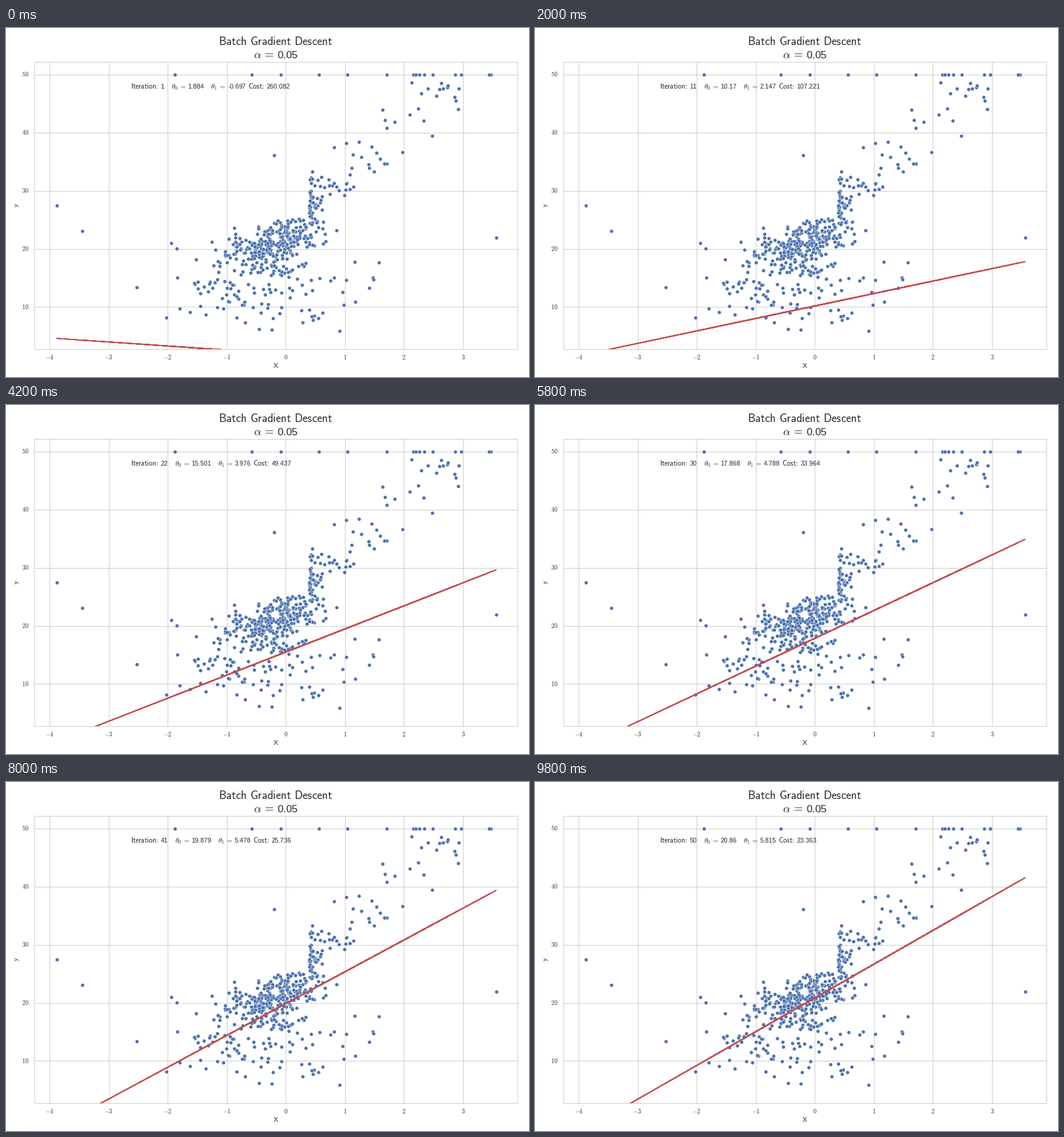
Recreate the animation shown at these times as a matplotlib script. Size 864 by 576 pixels, loop 10000 ms.

```python
import numpy as np
import matplotlib.pyplot as plt
from matplotlib.animation import FuncAnimation

W, H, DPI = 864, 576, 72
LEFT, RIGHT, TOP, BOTTOM = 46.8, 845.3, 56.3, 529.9   # plot box in pixels
X0, XS = 462.3, 97.57                                 # pixel of X = 0, pixels per unit
Y0, YS = 556.25, 9.583
BLUE, RED, INK, GRID = "#4C72B0", "#C44E52", "0.15", "0.8"

ALPHA, STEPS, INTERVAL = 0.05, 50, 200
BEST = np.array([22.532806, 6.38897])                 # least squares fit
GAP = np.array([20.6484, 7.08569])                    # distance to it at step 1
BEST_COST = 21.800276

WORD_SIZE, NUM_SIZE = 11.9, 10.5
ADVANCE = {".": 3.2, "-": 3.9}                        # every digit takes 5.85
SPACE = 3.97

plt.rcParams.update({
    "mathtext.fontset": "cm", "mathtext.default": "sf",
    "font.family": "Liberation Sans", "path.simplify": False,
})


def sans(s):
    """Upright sans math text with plain word spacing."""
    for c in ":=":
        s = s.replace(c, r"\hspace{-0.2}" + c + r"\hspace{-0.2}")
    return "$" + s.replace(" ", r"\hspace{0.38}") + "$"


def digits(s):
    """Text font laid out with the same metrics as math text."""
    return s + r"$\hspace{0}$"


def label(x, y, s, size, ha="center", **kw):
    """Text at a pixel position measured from the top left."""
    kw.setdefault("va", "baseline")
    return fig.text(x / W, 1 - y / H, s, fontsize=size, color=INK, ha=ha, **kw)


def fold(y, top):
    """Mirror values above a ceiling back below it."""
    return top - np.abs(top - y)


def make_points():
    rng = np.random.default_rng(11)
    capped = [-1.88, -0.58, -0.09, 0.56, 1.04, 1.71, 2.16, 2.2, 2.26,
              2.34, 2.49, 2.87, 2.97, 3.44, 3.47]
    lone = [(-3.88, 27.5), (-3.45, 23.1), (3.56, 21.9), (-0.2, 36.1),
            (1.47, 15.1), (1.58, 17.7), (0.98, 10.4)]
    core = rng.normal(-0.22, 0.42, 265)
    core_y = fold(21.6 + 3.2 * core + rng.normal(0, 2, core.size), 25.2)
    arm = 0.4 + 2.6 * rng.random(100) ** 2.5
    arm_y = fold(24 + 8.5 * arm + rng.normal(0, 2.7, arm.size), 49)
    low = rng.normal(-0.45, 0.75, 119)
    low_y = np.maximum(13 + rng.normal(0, 3.3, low.size), 5)
    groups = [(capped, np.full(len(capped), 50)), np.transpose(lone),
              (core, core_y), (arm, arm_y), (low, low_y)]
    return rng.permutation(np.hstack(groups).T)


fig = plt.figure(figsize=(W / DPI, H / DPI), dpi=DPI, facecolor="white")
ax = fig.add_axes([LEFT / W, 1 - BOTTOM / H, (RIGHT - LEFT) / W, (BOTTOM - TOP) / H])
ax.set_xlim((LEFT - X0) / XS, (RIGHT - X0) / XS)
ax.set_ylim((Y0 - BOTTOM) / YS, (Y0 - TOP) / YS)
ax.set_axisbelow(True)
ax.set_xticks(range(-4, 4))
ax.set_yticks(range(10, 51, 10))
ax.tick_params(length=0, labelbottom=False, labelleft=False)
ax.grid(color=GRID, lw=1)
for spine in ax.spines.values():
    spine.set(color=GRID, linewidth=1)

for t in range(-4, 4):
    label(X0 + t * XS, 547, rf"$\mathrm{{{t}}}$", 10)
for t in range(10, 51, 10):
    label(37.6, Y0 - t * YS + 3.4, rf"$\mathrm{{{t}}}$", 10, ha="right")
label(445.5, 561, sans("X"), 11.5)
label(18, 292, sans("y"), 11.5, va="center", rotation=90)
label(445.5, 28.3, sans("Batch Gradient Descent"), 18.7)
label(409, 50.3, sans(r"\alpha ="), 18.7, ha="left")
label(448, 50.3, digits(str(ALPHA)), 17, ha="left")

points = make_points()
ax.scatter(points[:, 0], points[:, 1], s=36, color=BLUE, edgecolors="white", linewidths=0.5)
fit, = ax.plot([], [], color=RED, lw=1.75, solid_capstyle="round")

# Status line: word, its width in pixels, spaces before it
WORDS = [("Iteration:", 49.2, 0), (r"\theta_{\mathrm{0}} =", 27.2, 3),
         (r"\theta_{\mathrm{1}} =", 27.2, 3), ("Cost:", 30.1, 1)]
status = [(label(0, 100.4, sans(word), WORD_SIZE, ha="left"),
           label(0, 100.4, "", NUM_SIZE, ha="left")) for word, _, _ in WORDS]


def write_status(values):
    x = 205.7
    for (word, number), (_, width, spaces), value in zip(status, WORDS, values):
        s = str(value)
        x += spaces * SPACE
        word.set_x(x / W)
        x += width
        number.set_x(x / W)
        number.set_text(digits(s))
        x += sum(ADVANCE.get(c, 5.85) for c in s)


def update(i):
    gap = GAP * (1 - ALPHA) ** i
    t0, t1 = BEST - gap
    cost = BEST_COST + (gap ** 2).sum() / 2
    fit.set_data(points[:, 0], t0 + t1 * points[:, 0])
    write_status([i + 1] + [round(float(v), 3) for v in (t0, t1, cost)])
    return [fit]


anim = FuncAnimation(fig, update, frames=STEPS, interval=INTERVAL,
                     init_func=lambda: update(0), repeat=True, repeat_delay=0, blit=False)
plt.show()
```
